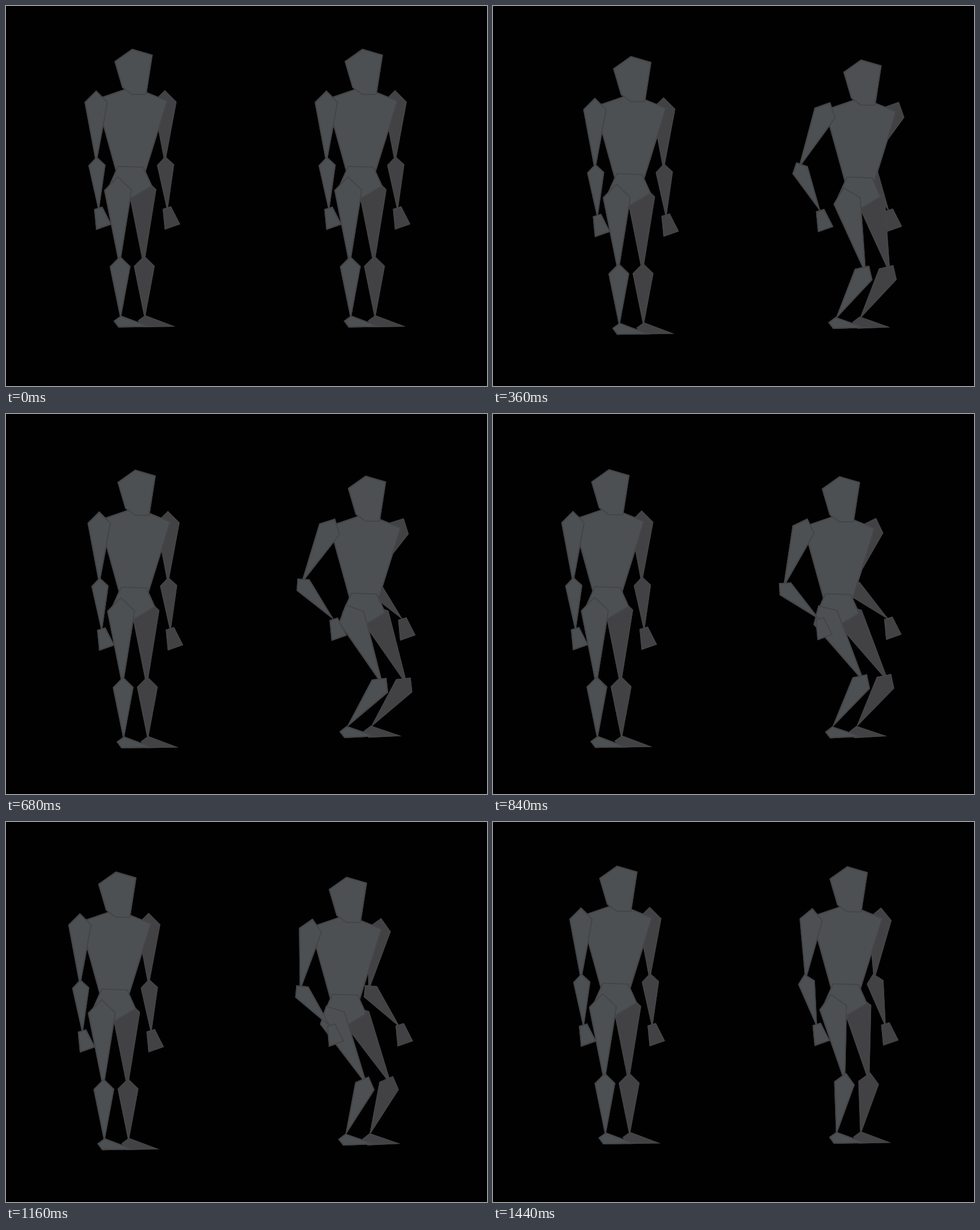
An HTML page with a canvas that plays this animation: 841 by 666 pixels, repeating every 1480 ms.

```html
<!DOCTYPE html>
<html>
<head>
<meta charset="utf-8">
<style>
  html, body { margin: 0; height: 100%; overflow: hidden; background: #010101; }
  canvas { display: block; }
</style>
</head>
<body>
<canvas id="stage" width="841" height="666"></canvas>
<script>
const ctx = document.getElementById('stage').getContext('2d');
const STEP = 40, LOOP = 1480, LEG_STEPS = 12;
const NEAR = '#4c5053', FAR = '#424244', EDGE = '#444446';

const add = (p, q) => [p[0] + q[0], p[1] + q[1]];
const mix = (p, q, u) => p.map((v, i) => v + (q[i] - v) * u);
const angle = (p, q) => Math.atan2(q[1] - p[1], q[0] - p[0]);
const dist = (p, q) => Math.hypot(q[0] - p[0], q[1] - p[1]);

// Bone shape: widest at `wide`, capped at a right angle, tapering to `tip`
function kite(wide, half, tip) {
  const a = angle(wide, tip), x = half * Math.cos(a), y = half * Math.sin(a);
  return [add(wide, [-x, -y]), add(wide, [y, -x]), tip, add(wide, [-y, x])];
}

// Rest pose of the near side; the far limbs are shifted copies
const HEAD = [[220.5, 75], [256.5, 85.5], [245.5, 156], [220, 156], [203, 143], [189.5, 97]];
const TORSO = [[157, 163], [208, 145.5], [246, 151], [283, 166], [244, 291], [192, 290]];
const PELVIS = [[195.5, 280], [240.5, 281.5], [256, 316], [219, 338], [205, 334], [179, 317]];
const LEG = {
  upper: kite([196, 322.5], 24.5, [198.5, 458]),
  lower: kite([199.5, 456.5], 18.2, [200.3, 550]),
  end: [[201, 542.5], [254, 562.5], [196.5, 563.5], [188, 552]],
  joints: [[196, 322.5], [199, 450], [201, 550]], far: [42.3, -0.6], bend: -1,
};
const ARM = {
  upper: kite([157.7, 168.5], 20.5, [157.7, 278]),
  lower: kite([159, 279], 15, [162.2, 361]),
  end: [[168.5, 351.5], [184.5, 383], [157.5, 392.5], [154, 356]],
  joints: [[158, 168.5], [159, 276], [162.5, 361]], far: [120, -0.6], bend: 1,
};

// The body rounds three corners along bulging edges; `SINK` lowers the bending figure further
const CORNERS = [[0, 0], [28.5, 20], [-41, 17.6]];
const BULGES = [[1.7, -0.7], [0, 3.7], [-1.2, 0]];
const SINK = [[0, 0], [0, 9], [1, 13.8]];

// Draws a shape with its rest point `pivot` moved to `at` and turned
function draw(points, pivot, at, turn, fill) {
  ctx.save();
  ctx.translate(...at);
  ctx.rotate(turn);
  ctx.translate(-pivot[0], -pivot[1]);
  ctx.beginPath();
  for (const p of points) ctx.lineTo(...p);
  ctx.closePath();
  ctx.fillStyle = fill;
  ctx.fill();
  ctx.clip();
  ctx.strokeStyle = EDGE;
  ctx.lineWidth = 4;
  ctx.stroke();
  ctx.restore();
}

// Two-bone inverse kinematics between the body and a held joint
function limb({ upper, lower, end, joints: [a, b, c], far, bend }, isFar, body, hold) {
  const fill = isFar ? FAR : NEAR, shift = isFar ? far : [0, 0];
  const place = (p, offset) => add(add(p, offset), shift);
  const root = place(a, body), tip = place(c, hold.joint);
  const l1 = dist(a, b), l2 = dist(b, c), d = dist(root, tip);
  const cos = Math.min(1, (l1 * l1 - l2 * l2 + d * d) / (2 * l1 * d));
  const dir = angle(root, tip) + bend * Math.acos(cos);
  const mid = add(root, [l1 * Math.cos(dir), l1 * Math.sin(dir)]);
  draw(upper, a, root, dir - angle(a, b), fill);
  draw(lower, b, mid, angle(mid, tip) - angle(b, c), fill);
  draw(end, c, place(c, hold.end), hold.turn, fill);
}

function figure(body, foot, hand) {
  limb(ARM, true, body, hand);
  limb(LEG, true, body, foot);
  for (const part of [TORSO, HEAD, PELVIS]) draw(part, [0, 0], body, 0, NEAR);
  limb(LEG, false, body, foot);
  limb(ARM, false, body, hand);
}

function render(now) {
  // The rest pose is held for two steps
  const step = Math.max(0, Math.floor(now % LOOP / STEP) - 1);
  const i = Math.floor(step / LEG_STEPS), next = (i + 1) % 3, u = step / LEG_STEPS - i;
  const bulge = 4 * u * (1 - u);
  const stiff = add(mix(CORNERS[i], CORNERS[next], u), BULGES[i].map(v => v * bulge));
  const sink = mix(SINK[i], SINK[next], u), depth = sink[1];
  const [x, y] = add(stiff, sink);

  // Held hands and feet drift a little with the body
  const handX = 1.5 * Math.sqrt(y) + 0.08 * x;
  const footX = -2.5 * Math.sqrt(depth) + 0.08 * x;
  const hand = { joint: [handX, 0], end: [handX, 0.06 * x + 0.15 * y], turn: 0 };
  const foot = { joint: [footX, 0], end: [footX, 0.4 * depth], turn: -0.003 * depth };
  const rigid = { joint: stiff, end: stiff, turn: 0 };

  ctx.fillStyle = '#010101';
  ctx.fillRect(0, 0, 841, 666);
  figure(stiff, rigid, rigid);
  ctx.save();
  ctx.translate(402.5, 0);
  figure([x, y], foot, hand);
  ctx.restore();
}

const start = performance.now();
function tick() {
  render(performance.now() - start);
  requestAnimationFrame(tick);
}
tick();
</script>
</body>
</html>
```
